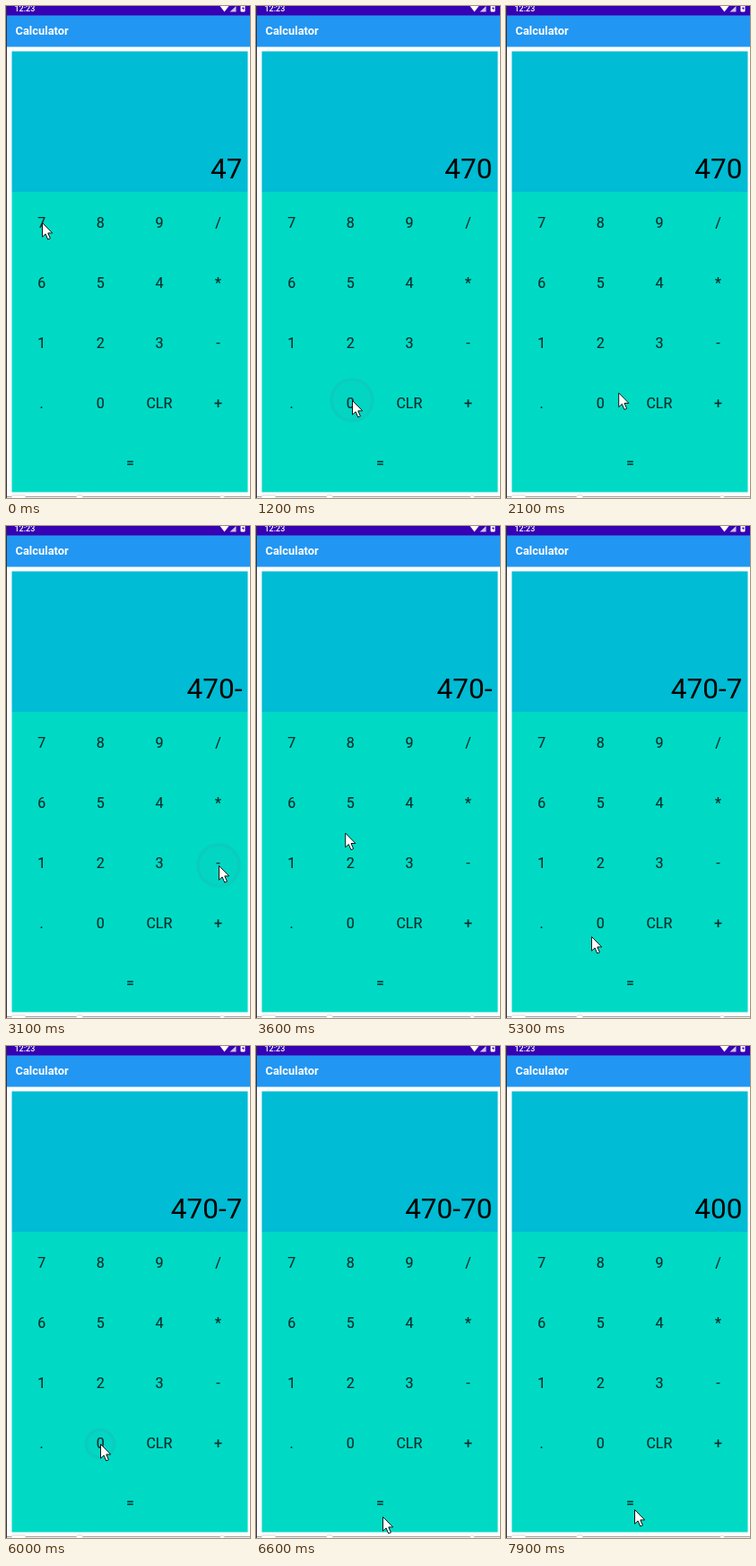
Animation of 272 by 548 pixels, one loop 8000 ms. Source, as an HTML page:

```html
<!DOCTYPE html>
<html lang="en">
<head>
<meta charset="utf-8">
<title>Calculator</title>
<style>
  html, body { margin: 0; width: 100%; height: 100%; overflow: hidden; background: #fff; }
  svg { display: block; width: 100vw; height: 100vh; }
  text { font-family: Roboto, "Noto Sans", sans-serif; }
  .key { font-size: 16px; text-anchor: middle; fill: #052c29; stroke: #052c29; stroke-width: .15; }
</style>
</head>
<body>
<svg viewBox="0 0 272 548" xmlns="http://www.w3.org/2000/svg">
  <rect width="272" height="548" fill="#fff"/>
  <rect width="272" height="11" fill="#3700b3"/>
  <text x="9.5" y="6" font-size="9" font-weight="500" fill="#fff">12:23</text>
  <g fill="#fff">
    <path d="M238.5 0H248.5L243.5 6.5Z"/>
    <path d="M256.5 0V6.5H249.5Z" opacity=".75"/>
    <rect x="261.5" y="-2" width="5" height="8.5" rx=".8"/>
  </g>
  <path d="M264.5 0l-1.500 3h1.200v2l1.500-3h-1.200z" fill="#3700b3"/>

  <rect y="10.500" width="272" height="35" fill="#2196f3"/>
  <text x="10.500" y="32" font-size="12.900" font-weight="600" fill="#fff">Calculator</text>

  <rect x="6.500" y="50.500" width="263" height="156.500" fill="#00bcd4"/>
  <rect x="6.500" y="207" width="263" height="334.500" fill="#00dac5"/>
  <rect width="1" height="548" fill="#30343a"/>

  <rect x="1" y="546" width="271" height="1.200" fill="#a6a6a6"/>
  <g fill="#fff" stroke="#c4c4c4" stroke-width=".6">
    <rect x="6" y="545" width="16" height="6" rx="2"/>
    <circle cx="82" cy="548.500" r="4"/>
    <circle cx="241" cy="548.500" r="3"/>
  </g>

  <text id="display" x="263.400" y="191.800" font-size="31.500" text-anchor="end" fill="#000"></text>
  <circle id="ripple" fill="#4b7f9c" fill-opacity=".3" stroke="#4b7f9c" stroke-width="4"/>
  <g id="keys"></g>
  <path id="cursor" d="M.5 .5V16.200L4.100 12.900L6.700 19L9.400 17.900L6.800 11.900H11.700Z"
        fill="#fff" stroke="#111" stroke-width="1" stroke-linejoin="round"/>
</svg>
<script>
const LOOP = 8000, STEP = 100;
const PRESS_DELAY = 50, TYPE_DELAY = 200, RIPPLE_TIME = 500, RIPPLE_SIZE = 25;
const byId = id => document.getElementById(id);
const display = byId('display'), ripple = byId('ripple'), cursor = byId('cursor');

function setAll(node, attrs) {
  for (const name in attrs) node.setAttribute(name, attrs[name]);
}

function addKey(label, x, y) {
  const key = document.createElementNS('http://www.w3.org/2000/svg', 'text');
  setAll(key, { class: 'key', x, y });
  key.textContent = label;
  byId('keys').append(key);
}
['7 8 9 /', '6 5 4 *', '1 2 3 -', '. 0 CLR +'].forEach((row, r) =>
  row.split(' ').forEach((label, c) => addKey(label, 39.7 + c * 65.6, 246.7 + r * 67)));
addKey('=', 138.5, 514.7);

// Each move eases the pointer to x, y; a key is pressed on arrival.
const home = { x: 40, y: 241 };
const moves = [
  { start: 300, end: 950, x: 107, y: 439, key: '0' },
  { start: 1900, end: 2750, x: 237, y: 378, key: '-' },
  { start: 3250, end: 3800, x: 40, y: 326 },
  { start: 3800, end: 4200, x: 56, y: 274 },
  { start: 4400, end: 4650, x: 41, y: 243, key: '7' },
  { start: 5000, end: 5300, x: 95, y: 457 },
  { start: 5300, end: 5850, x: 105, y: 443, key: '0' },
  { start: 6150, end: 6500, x: 141, y: 524 },
  { start: 6950, end: 7150, x: 143, y: 516, key: '=' }
];
const presses = moves.filter(m => m.key).map(m => ({ ...m, time: m.end + PRESS_DELAY }));

const clamp = v => Math.min(1, Math.max(0, v));
const smooth = u => u * u * (3 - 2 * u);

function pointer(t) {
  return moves.reduce((p, m) => {
    const s = smooth(clamp((t - m.start) / (m.end - m.start)));
    return { x: p.x + (m.x - p.x) * s, y: p.y + (m.y - p.y) * s };
  }, home);
}

function press(text, key) {
  if (key !== '=') return text + key;
  const [a, b] = text.split('-');
  return String(a - b);
}

function reading(t) {
  return presses.filter(p => t >= p.time + TYPE_DELAY).reduce((text, p) => press(text, p.key), '47');
}

function drawRipple(t) {
  const tap = presses.find(p => t >= p.time && t < p.time + RIPPLE_TIME);
  ripple.setAttribute('visibility', tap ? 'visible' : 'hidden');
  if (!tap) return;
  const age = t - tap.time;
  const grow = 1 - (1 - clamp(age / 220)) ** 2;
  setAll(ripple, {
    cx: tap.x,
    cy: tap.y,
    r: Math.max(0, RIPPLE_SIZE * grow - 2),
    opacity: .13 * clamp((RIPPLE_TIME - age) / 200)
  });
}

function draw(t) {
  const { x, y } = pointer(t);
  display.textContent = reading(t);
  drawRipple(t);
  cursor.setAttribute('transform', `translate(${x} ${y})`);
}

const origin = performance.now();
function tick() {
  const t = (performance.now() - origin) % LOOP;
  draw(Math.floor(t / STEP) * STEP);
  requestAnimationFrame(tick);
}
tick();
</script>
</body>
</html>
```
